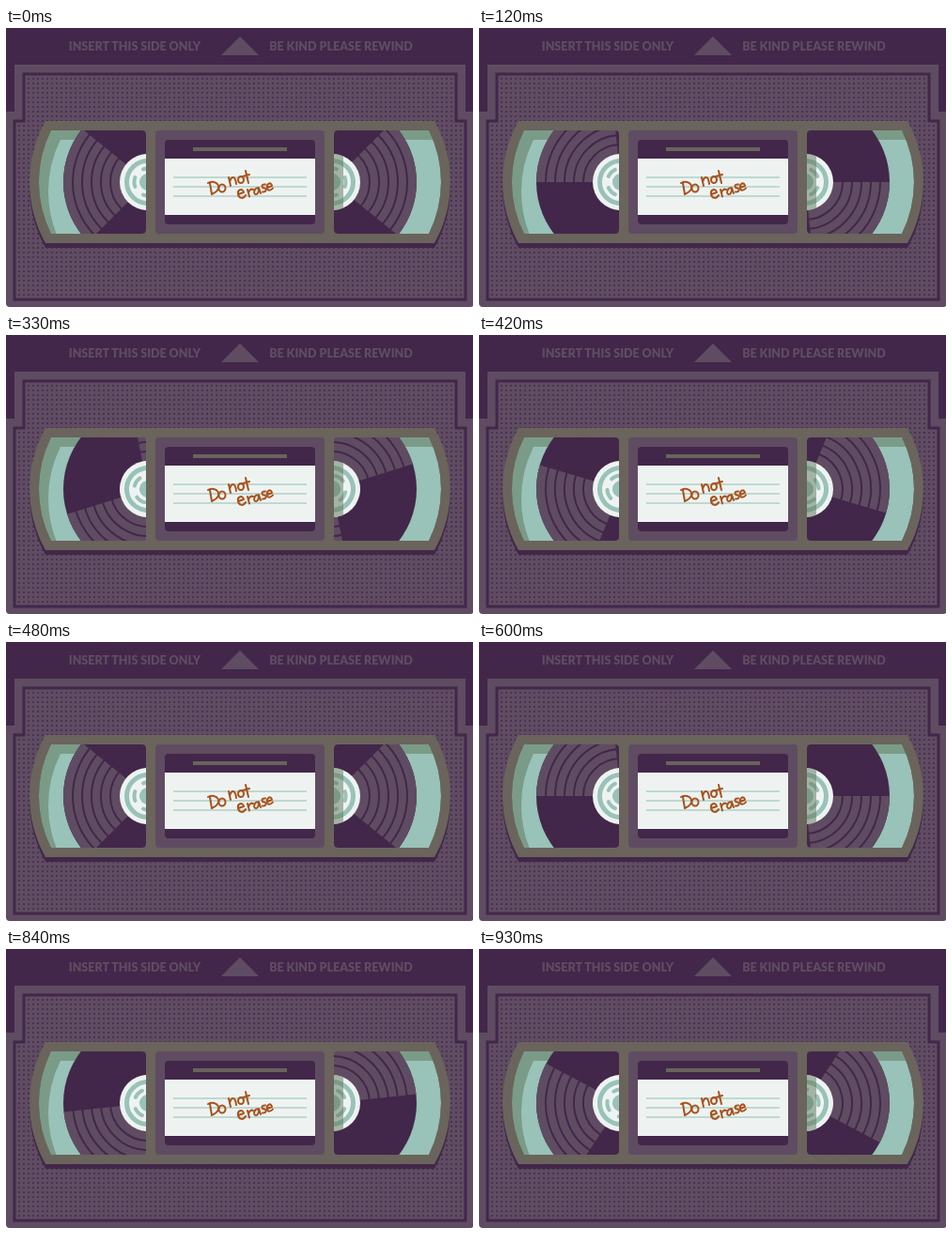
Animation, 497 px wide and 297 px high, one loop 0.96 s. Source, as an HTML page:

```html
<!DOCTYPE html>
<html lang="en">
<head>
<meta charset="utf-8">
<title>Video cassette</title>
<style>
  :root { --dark: #42274a; --body: #5f4c62; --olive: #6a645c; --teal: #99c2b8; --white: #eef3f1; }
  html, body { margin: 0; width: 100%; height: 100%; overflow: hidden; background: #fff; }
  svg { display: block; }
  .dark { fill: var(--dark); }
  .body { fill: var(--body); }
  .olive { fill: var(--olive); }
  .teal { fill: var(--teal); }
  .white { fill: var(--white); }
  .line { fill: none; stroke: var(--dark); stroke-width: 2; }
  .ring { fill: none; stroke: var(--teal); stroke-linecap: round; }
  .shade { fill: #5d7658; fill-opacity: .5; fill-rule: evenodd; }
  .pen { fill: none; stroke: #a9521d; stroke-width: 2; stroke-linecap: round; stroke-linejoin: round; }
  text { font: 900 12.5px Lato, sans-serif; text-anchor: middle; }
</style>
</head>
<body>
<svg width="497" height="297" viewBox="0 0 497 297">
  <defs>
    <pattern id="dots" x="22" y="52" width="5" height="5" patternUnits="userSpaceOnUse">
      <circle class="dark" cx="2" cy="2" r="1"/>
    </pattern>
    <path id="frame" d="M42 99H456A133 133 0 0 1 456 229H42A133 133 0 0 1 42 99Z"/>
    <path id="leftWindow" d="M48 109H145a4 4 0 0 1 4 4V215a4 4 0 0 1-4 4H48A123 123 0 0 1 48 109Z"/>
    <path id="rightWindow" d="M450 109H353a4 4 0 0 0-4 4V215a4 4 0 0 0 4 4H450A123 123 0 0 0 450 109Z"/>
    <clipPath id="leftClip"><use href="#leftWindow"/></clipPath>
    <clipPath id="rightClip"><use href="#rightWindow"/></clipPath>
    <g id="reel">
      <g id="spin">
        <circle class="dark" r="90"/>
        <path class="body" d="M63.6-63.6L-63.6 63.6A90 90 0 0 1-69.9-56.6L69.9 56.6A90 90 0 0 0 63.6-63.6Z"/>
        <g class="line">
          <circle r="80"/><circle r="70"/><circle r="60"/><circle r="50"/><circle r="40"/>
        </g>
        <circle class="white" r="30"/>
        <circle class="ring" r="22.5" stroke-width="5"/>
        <circle class="ring" r="14.5" stroke-width="4" pathLength="360" stroke-dasharray="40 50" stroke-dashoffset="20"/>
        <circle class="teal" r="9"/>
      </g>
    </g>
  </defs>

  <rect class="dark" width="497" height="100"/>
  <g class="body">
    <text x="137" y="24">INSERT THIS SIDE ONLY</text>
    <text x="356.5" y="24">BE KIND PLEASE REWIND</text>
    <path d="M249 9L269 29H229Z"/>
    <path d="M9 39H489V89H498V293a4 4 0 0 1-4 4H4a4 4 0 0 1-4-4V89H9Z"/>
  </g>
  <path d="M19 49H479V99H489V289H9V99H19Z" fill="url(#dots)" stroke="#42274a" stroke-width="3"/>

  <use href="#frame" class="dark" y="5"/>
  <use href="#frame" class="olive"/>

  <g clip-path="url(#leftClip)">
    <use href="#leftWindow" class="teal"/>
    <path class="shade" d="M0 99H200V229H0ZM58 119H200V229H58A123 123 0 0 1 58 119Z"/>
    <use href="#reel" x="151" y="164"/>
  </g>
  <g clip-path="url(#rightClip)">
    <use href="#rightWindow" class="teal"/>
    <rect class="shade" x="349" y="109" width="120" height="10"/>
    <use href="#reel" x="347" y="164"/>
    <path class="shade" d="M347 134A30 30 0 0 1 359 136.500V191.500A30 30 0 0 1 347 194Z"/>
  </g>

  <rect class="body" x="159" y="109" width="180" height="110" rx="4"/>
  <rect class="dark" x="169" y="119" width="160" height="90" rx="4"/>
  <rect class="white" x="169" y="139" width="160" height="60"/>
  <rect class="olive" x="199" y="127" width="100" height="4"/>
  <path d="M178 159H320M178 169H320M178 179H320" stroke="#bfd8d0" stroke-width="2"/>
  <g class="pen" role="img" aria-label="Do not erase">
    <path d="M217 165L219 177M215 165C224 160 233 171 219 177"/>
    <ellipse cx="230" cy="170.500" rx="3.500" ry="4"/>
    <path d="M237 159L239 168M238 164C240 157 244 157 245 166"/>
    <ellipse cx="250" cy="161.500" rx="3" ry="3.500"/>
    <path d="M255 152L258 165M252 158L259 156"/>
    <path d="M247 177L253 175C252 170 246 172 247 177C248 182 253 182 255 178"/>
    <path d="M257 172L259 179.500M258 175.500C259 172 261 171 263 172"/>
    <path d="M269 171C265 168 262 177 266 177C269 177 269 172 269 170L271 176"/>
    <path d="M276 166.500C271 166 272 170 275 170.500C278 171 277 175 273 174.500"/>
    <path d="M278 170L283 168C282 163 277 166 278 170C278 174 282 173 284 170.500"/>
  </g>
</svg>
<script>
  const STEP_MS = 30, STEP_DEG = 11.25;
  const spin = document.getElementById('spin');
  const start = performance.now();

  function draw(now) {
    const step = Math.floor(Math.max(0, now - start) / STEP_MS) % 32;
    spin.setAttribute('transform', `rotate(${step * STEP_DEG})`);
    requestAnimationFrame(draw);
  }
  draw(start);
</script>
</body>
</html>
```
